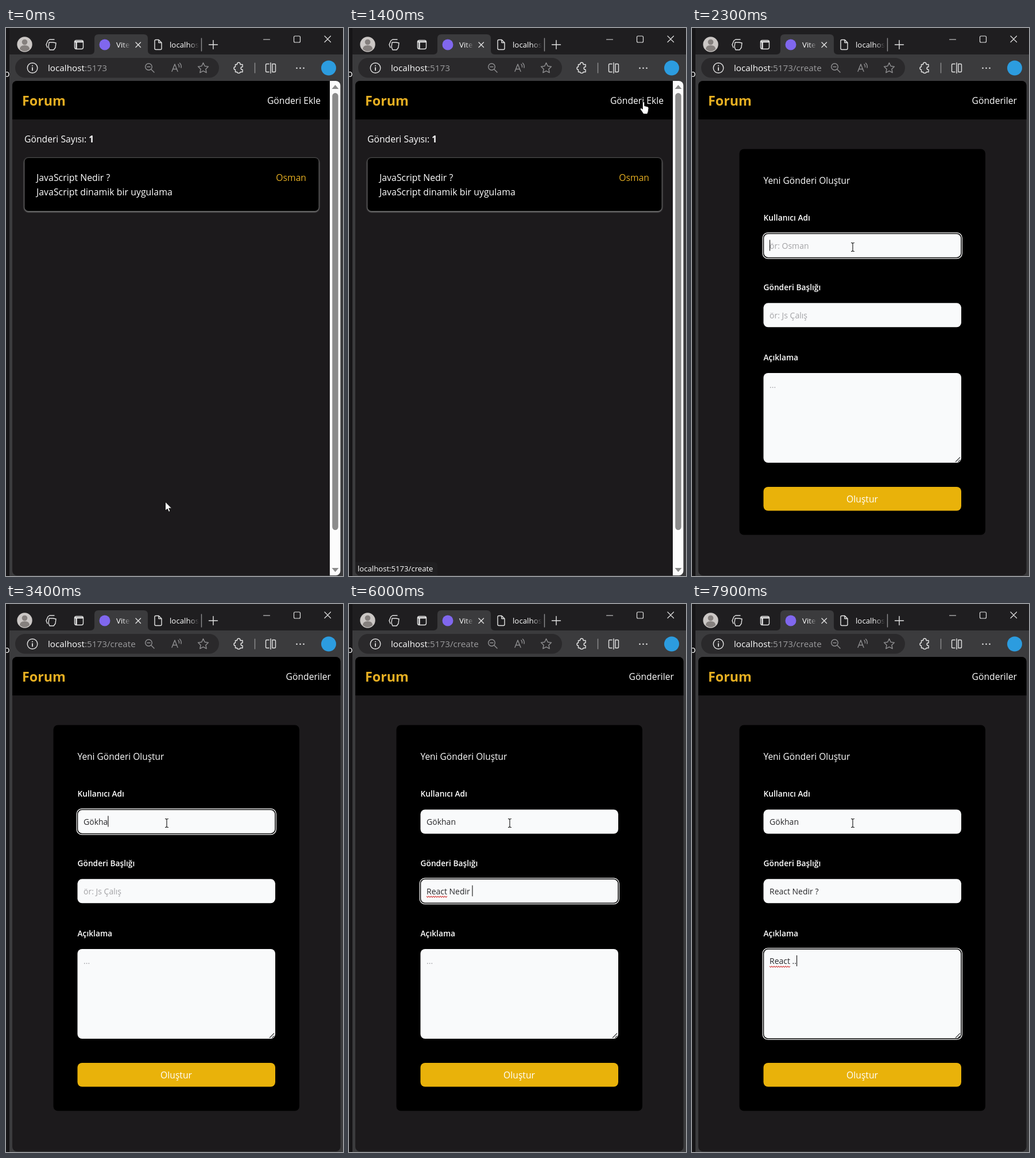
Animation, 587 px wide and 953 px high, one loop 8 s. Source, as an HTML page:

```html
<!DOCTYPE html>
<html lang="tr">
<head>
<meta charset="utf-8">
<title>Forum</title>
<style>
  html, body { margin: 0; width: 100%; height: 100%; overflow: hidden; background: #3b3b3d; }
  svg { display: block; }
  text { font: 15.7px "Open Sans", "Noto Sans", sans-serif; fill: #fff; white-space: pre; }
  .url { font-size: 15.27px; }
  .tab { font-size: 13.3px; }
  .label { font-size: 13.75px; font-weight: 600; }
  .input { font-size: 14px; }
  .gold { fill: #e6af22; }
  .icon { fill: none; stroke: #e4e4e4; stroke-width: 1.4; stroke-linecap: round; stroke-linejoin: round; }
  .dim { stroke: #8f8f91; }
  .card { fill: #000; stroke: #4c4c4c; filter: drop-shadow(0 1px 1px #999); }
  .pointer { fill: #fff; stroke: #111; stroke-linejoin: round; }
</style>
</head>
<body>
<svg width="587" height="953" viewBox="0 0 587 953">
  <defs>
    <linearGradient id="fade1" gradientUnits="userSpaceOnUse" x1="203" x2="217" y1="0" y2="0">
      <stop stop-color="#fff"/><stop offset="1" stop-color="#fff" stop-opacity="0"/>
    </linearGradient>
    <linearGradient id="fade2" gradientUnits="userSpaceOnUse" x1="318" x2="336" y1="0" y2="0">
      <stop stop-color="#fff"/><stop offset="1" stop-color="#fff" stop-opacity="0"/>
    </linearGradient>
    <clipPath id="view"><rect x="11" y="92" width="571.5" height="860" rx="8"/></clipPath>
  </defs>

  <!-- Browser frame -->
  <rect width="587" height="953" fill="#3b3b3d"/>
  <rect width="6" height="953" fill="#161517"/>
  <text x="-3" y="85" font-size="14">o</text>
  <rect x="6" width="581" height="46" fill="#1f1e20"/>
  <path d="M147 46q7 0 7-7V18q0-7 7-7h79q7 0 7 7v21q0 7 7 7z" fill="#3b3b3d"/>
  <circle cx="32.5" cy="28.5" r="13.2" fill="#cbc7c5"/>
  <path d="M24 37q0-7 8.500-7t8.500 7q-8.500 7-17 0z" fill="#85807e"/>
  <circle cx="32.500" cy="24.500" r="4.800" fill="#85807e"/>
  <circle cx="172" cy="29" r="9.500" fill="#8067ee"/>
  <text class="tab" x="192" y="33.500" style="fill:url(#fade1)">Vite</text>
  <text class="tab" x="285" y="33.500" style="fill:url(#fade2)">localhost</text>
  <g class="icon">
    <path d="M75 25h7l5 1-1 8-3 4h-7l-2-5zM72 34l-2-5 3-7 3-2h8"/>
    <rect x="119.500" y="21.500" width="15" height="15" rx="3"/>
    <path d="M120 24h14M122.500 25v10" stroke-width="2.500"/>
    <path d="M226 25l8.500 8.500m0-8.500l-8.500 8.500"/>
    <path d="M266 20.500h-5q-2 0-2 2v13q0 2 2 2h8q2 0 2-2v-10zv5h5"/>
    <path d="M340.500 18v22" class="dim"/>
    <path d="M361 21.500v15m-7.500-7.500h15"/>
    <path d="M448.500 20h11M555 14l10.500 10.500m0-10.500L555 24.500" stroke-width="1.200"/>
    <rect x="501.500" y="14" width="11" height="11" rx="2" stroke-width="1.200"/>
  </g>
  <rect x="16" y="52" width="355" height="34.500" rx="17.200" fill="#2a292b"/>
  <g class="icon">
    <circle cx="46" cy="69.500" r="8.800"/>
    <path d="M46 69v4.500M46 65.500v.2" stroke-width="1.800"/>
    <g class="dim">
      <circle cx="248.500" cy="67.500" r="5.800"/><path d="M253 72l5 5M246 67.500h5"/>
      <path d="M289 75.500l5-12.500 5 12.500m-8.500-4h7M300 63q2 2 1.500 5M302.500 61q3.500 3 2.500 8"/>
      <path d="M343.500 60.500l2.700 5.800 6.300.8-4.600 4.300 1.200 6.300-5.600-3.100-5.600 3.100 1.200-6.300-4.600-4.300 6.300-.8z"/>
      <path d="M433.500 61v17"/>
    </g>
    <path d="M399.500 63.500h3q0-3.500 2.800-3.500t2.800 3.500h4v4q-3 0-3 2.500t3 2.500v4h-4q0 2-2.800 2t-2.800-2h-3v-4q-2.500 0-2.500-2.500t2.500-2.500z"/>
    <path d="M458 62.500h-4q-1.500 0-1.500 2v10q0 2 1.500 2h4M464 62.500h4q1.500 0 1.500 2v10q0 2-1.500 2h-4zM461 60.500v18"/>
    <path d="M506.500 69.800h.01m5.990 0h.01m5.990 0h.01" stroke-width="2.600"/>
  </g>
  <circle cx="562" cy="69.500" r="13" fill="#2c9cdf"/>
  <text class="url" x="73" y="74.500">localhost<tspan fill="#9b9b9d">:5173<tspan id="path">/create</tspan></tspan></text>

  <!-- Page -->
  <g clip-path="url(#view)">
    <rect x="11" y="92" width="572" height="861" fill="#1c1a1c"/>
    <rect x="11" y="92" width="572" height="67" fill="#000"/>
    <text class="gold" x="28" y="135" style="font-size:23.3px;font-weight:700">Forum</text>

    <g id="list">
      <text x="548" y="131.500" text-anchor="end">Gönderi Ekle</text>
      <text x="32" y="198.500">Gönderi Sayısı: <tspan font-weight="700">1</tspan></text>
      <rect class="card" x="32" y="225.500" width="513" height="93" rx="7"/>
      <text x="53" y="265.500" style="font-size:15.9px">JavaScript Nedir ?</text>
      <text x="53" y="290.800" style="font-size:15.9px">JavaScript dinamik bir uygulama</text>
      <text class="gold" x="523" y="265.500" text-anchor="end">Osman</text>
      <rect x="564" y="92" width="19" height="861" fill="#fcfcfc"/>
      <rect x="568.300" y="113" width="10.400" height="760" rx="5.200" fill="#8b8b8b"/>
      <path d="M567.500 106l6-7 6 7zM567.500 939l6 7 6-7z" fill="#8b8b8b"/>
    </g>

    <g id="create">
      <text x="566" y="131.500" text-anchor="end">Gönderiler</text>
      <rect x="82.500" y="210.500" width="428.500" height="671" rx="8" fill="#000"/>
      <text x="124.500" y="271" style="font-size:15.5px">Yeni Gönderi Oluştur</text>
      <g id="fields"></g>
      <path d="M459 754.500l8-8m-3.500 8l3.500-3.500" stroke="#444" stroke-width="1.300"/>
      <rect x="124.500" y="798" width="344.500" height="41.500" rx="8" fill="#e9b20a"/>
      <text x="296.500" y="824.500" text-anchor="middle">Oluştur</text>
    </g>

    <g id="status">
      <path d="M11 929h137q6 0 6 6v18H11z" fill="#201f21"/>
      <text x="15" y="944.500" style="font-size:13.15px"></text>
    </g>
  </g>

  <path id="arrow" class="pointer" d="M0 0v15.500l3.600-3.300 2.500 5.300 2.500-1.200-2.400-5.100h5z"/>
  <path id="hand" class="pointer" d="M-1.700 1.500q1.700-3 3.400 0v6l5.300 1.200q2 .5 2 2.800l-1 6.500-1.500 3.500H0l-5.500-8q-.5-2.500 2-2l1.800 1.600z"/>
  <path id="beam" d="M-3-7.500q3 0 3 1.500 0-1.500 3-1.500M0-6v12M-3 7.500q3 0 3-1.500 0 1.500 3 1.500" fill="none" stroke="#222" stroke-width="1.200"/>
</svg>

<script>
const DURATION = 8000, STEP = 100;
const OPEN_FORM = 1500;
const $ = id => document.getElementById(id);
const show = (el, on) => el.setAttribute('visibility', on ? 'visible' : 'hidden');

// Each field: box, focus interval and the time of every key press.
const fields = [
  { label: 'Kullanıcı Adı', hint: 'ör: Osman', value: 'Gökhan', y: 357.5, h: 42,
    focus: 2200, blur: 3800, keys: [2500, 2700, 3000, 3200, 3400, 3500] },
  { label: 'Gönderi Başlığı', hint: 'ör: Js Çalış', value: 'React Nedir ?', y: 478.3, h: 42, spell: true,
    focus: 3800, blur: 6500, keys: [4700, 4800, 4900, 5000, 5200, 5300, 5400, 5500, 5600, 5700, 5800, 6000, 6300] },
  { label: 'Açıklama', hint: '...', value: 'React ..', y: 600, h: 156, spell: true,
    focus: 6500, blur: DURATION, keys: [6900, 7000, 7100, 7300, 7400, 7700, 7800, 7900] }
];

for (const f of fields) {
  const base = f.y + 26.3;
  const g = document.createElementNS('http://www.w3.org/2000/svg', 'g');
  g.innerHTML = `
    <text class="label" x="124.5" y="${f.y - 22.3}">${f.label}</text>
    <rect x="123.300" y="${f.y - 1.2}" width="346.900" height="${f.h + 2.4}" rx="9" fill="#000" stroke="#fff" stroke-width="1.600"/>
    <rect x="124.500" y="${f.y}" width="344.500" height="${f.h}" rx="8" fill="#f9fafb"/>
    <text class="input" x="135" y="${base}"></text>
    <path d="M135 ${base + 3.5}${'l2 2 2-2'.repeat(9)}" fill="none" stroke="#d4403f" stroke-width="1.100"/>
    <rect y="${base - 15.3}" width="1.100" height="19" fill="#111"/>`;
  $('fields').append(g);
  [, f.ring, f.box, f.text, f.wave, f.caret] = g.children;
}

function drawField(f, t) {
  const count = f.keys.filter(k => k <= t).length;
  const active = t >= f.focus && t < f.blur;
  const lastEvent = count ? f.keys[count - 1] : f.focus;
  f.text.textContent = count ? f.value.slice(0, count) : f.hint;
  f.text.style.fill = count ? '#27272a' : '#a3a3a6';
  f.box.setAttribute('stroke', active ? '#0c0c0c' : 'none');
  f.box.setAttribute('stroke-width', 1.6);
  f.caret.setAttribute('x', 135 + (count ? f.text.getComputedTextLength() : 0));
  const shown = t >= OPEN_FORM;
  show(f.ring, shown && active);
  show(f.wave, shown && active && f.spell && count > 5);
  show(f.caret, shown && active && Math.floor((t - lastEvent) / 500) % 2 === 0);
}

const ease = (t, from, to) => {
  const u = Math.min(1, Math.max(0, (t - from) / (to - from)));
  return u * u * (3 - 2 * u);
};

function drawPointer(t) {
  const toLink = ease(t, 300, 1200), toField = ease(t, 1500, 2100);
  const x = 277.5 + 235.5 * toLink - 233 * toField;
  const y = 824 - 696 * toLink + 253 * toField;
  const kind = y < 142 && x > 455 ? 'hand' : t > OPEN_FORM && y > 357 ? 'beam' : 'arrow';
  for (const id of ['arrow', 'hand', 'beam']) {
    show($(id), id === kind);
    $(id).setAttribute('transform', `translate(${x} ${y})`);
  }
}

function draw(t) {
  const creating = t >= OPEN_FORM;
  show($('list'), !creating);
  show($('create'), creating);
  show($('path'), creating);
  show($('status'), t >= 1300 && t < 1800);
  $('status').lastElementChild.textContent = 'localhost:5173' + (creating ? '' : '/create');
  fields.forEach(f => drawField(f, t));
  drawPointer(t);
}

const start = performance.now();
function tick() {
  const t = (performance.now() - start) % DURATION;
  draw(Math.floor(t / STEP) * STEP);
  requestAnimationFrame(tick);
}
tick();
</script>
</body>
</html>
```
